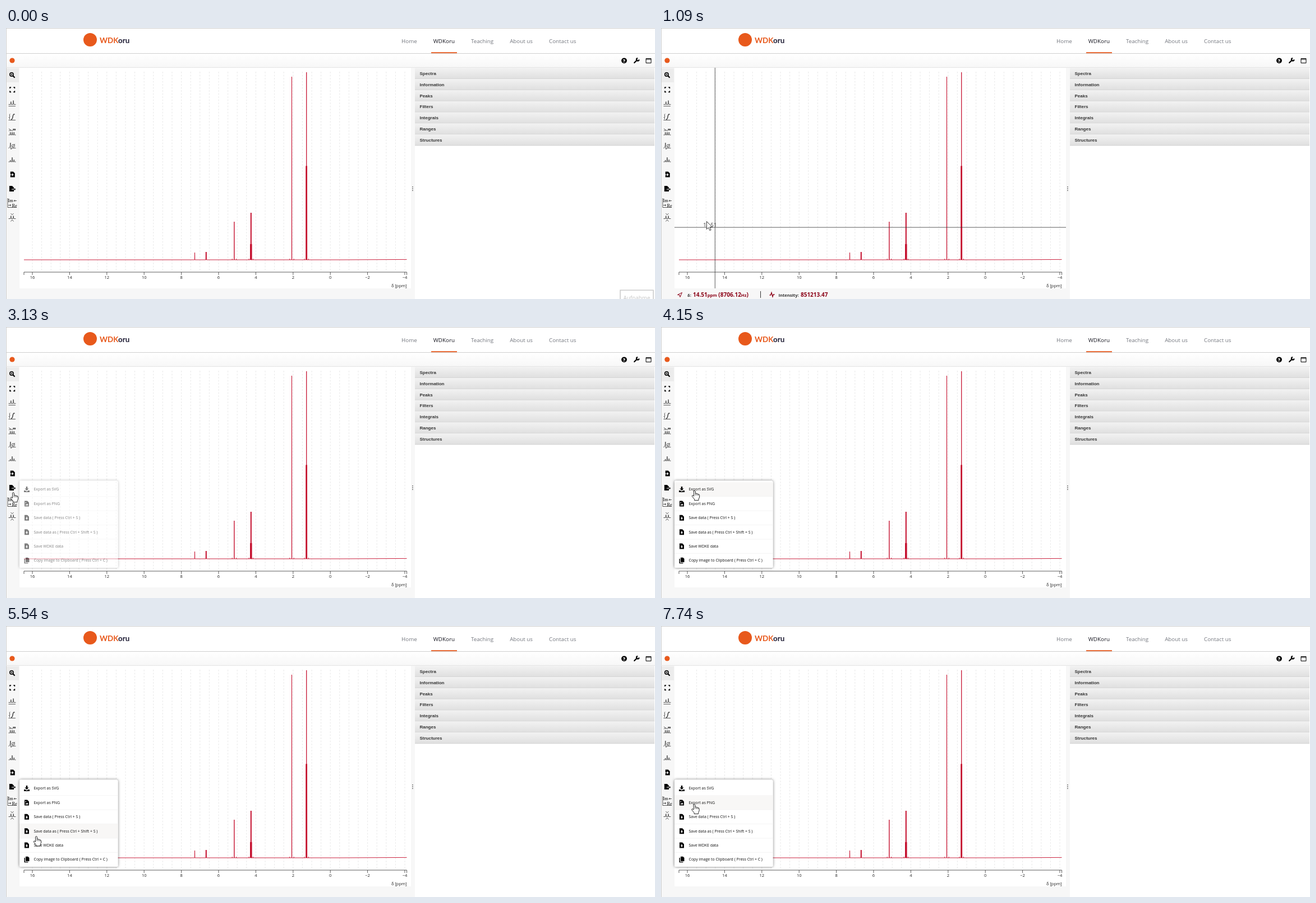
Recreate the animation shown at these times as an HTML page. Size 1157x484 px, loop 8000 ms.

```html
<!DOCTYPE html>
<html lang="en">
<head>
<meta charset="utf-8">
<title>Spectrum viewer</title>
<style>
html, body { margin: 0; width: 100%; height: 100%; overflow: hidden; background: #fff; }
svg { display: block; width: 100vw; height: 100vh; }
text { font-family: "Open Sans", "Noto Sans", sans-serif; white-space: pre; }
.nav { font-size: 9.8px; fill: #74777f; }
.nav .active { fill: #15151f; }
.axis { font-size: 7.5px; fill: #222; }
.head { font: bold 8px "Liberation Sans", Arial, sans-serif; fill: #333; }
.item { font-size: 6.95px; fill: #111; }
.foot { font-weight: 700; font-size: 7.6px; fill: #333; }
.foot .val { font-size: 10px; fill: #8b0016; }
.foot .unit { font-size: 7.6px; fill: #8b0016; }
.serif { font-family: "Liberation Serif", "Times New Roman", serif; }
.line { fill: none; stroke: #333; stroke-width: .8; }
</style>
</head>
<body>
<svg viewBox="0 0 1157 484" preserveAspectRatio="none">
  <defs>
    <linearGradient id="bar" x2="0" y2="1">
      <stop stop-color="#f2f2f2"/><stop offset="1" stop-color="#dfdfdf"/>
    </linearGradient>
    <linearGradient id="strip" x2="0" y2="1">
      <stop stop-color="#fff"/><stop offset="1" stop-color="#f7f7f7"/>
    </linearGradient>
    <filter id="shadow" x="-10%" y="-10%" width="120%" height="120%">
      <feDropShadow dx="0" dy="0" stdDeviation="2.6" flood-opacity=".55"/>
    </filter>
    <clipPath id="tools"><path d="M0 71H19.5V484H0Z"/></clipPath>
    <path id="file" d="M-4-5H1L4-2V5H-4Z"/>
  </defs>

  <path fill="#fff" d="M0 0H1157V484H0Z"/>
  <path fill="url(#strip)" d="M0 46H1157V71H0Z"/>
  <path fill="#f7f7f7" d="M0 71H24V484H0ZM24 465H729V484H24ZM722 71H729V484H722Z"/>
  <path fill="#ececec" d="M1 72H23V97H1Z"/>
  <path fill="none" stroke="#cfcfcf" d="M0 .5H1157M.5 0V484M0 45.5H1157"/>
  <path fill="none" stroke="#e4e4e4" d="M0 70.5H1157"/>

  <circle cx="150" cy="21" r="12" fill="#e8591c"/>
  <text x="167" y="27" font-size="13.4" font-weight="700" fill="#e8591c" style="font-family:Lato,sans-serif">WDK<tspan fill="#1d1b33">oru</tspan></text>
  <text class="nav" x="705" y="26.6">Home<tspan class="active" dx="29">WDKoru</tspan><tspan dx="29">Teaching</tspan><tspan dx="29">About us</tspan><tspan dx="29">Contact us</tspan></text>
  <path fill="#e8591c" d="M758 43.2H804V45H758Z"/>

  <circle cx="11" cy="58" r="4.6" fill="#e8591c"/>
  <circle cx="1102" cy="58.3" r="4.9"/>
  <text x="1102" y="61.5" text-anchor="middle" font-size="8.5" font-weight="800" fill="#fff">?</text>
  <path fill="none" stroke="#000" stroke-width="2.2" stroke-linecap="round" d="M1120.2 62L1125 57.2"/>
  <path fill="none" stroke="#000" stroke-width="2" d="M1126.2 53.9A2.4 2.4 0 1 0 1128.6 56.4"/>
  <path fill="none" stroke="#000" d="M1141 54.5H1150V62.5H1141ZM1141 56H1150"/>

  <g id="plot"></g>
  <g id="panel"></g>
  <path stroke="#444" stroke-width="1.4" stroke-dasharray="1.4 1.9" d="M724.9 283V291.5"/>

  <g clip-path="url(#tools)">
    <g fill="none" stroke="#000">
      <circle cx="10" cy="83" r="3.2" stroke-width="1.5"/>
      <path stroke-width="2" d="M12.5 85.5L15.6 88.7"/>
      <path stroke-width=".9" d="M8.3 83h3.4M10 81.3v3.4"/>
      <rect x="7" y="106" width="8.4" height="8.4" stroke-width="1.6" stroke-dasharray="4.2" stroke-dashoffset="2.1"/>
    </g>
    <g class="line">
      <path id="spikes"/>
      <path d="M4.5 139.5H17M4.5 164.5H17M7.5 153.5Q5.5 153.5 6.5 157T5 159.5Q7 160 6.5 163"/>
      <path stroke-width="1.4" d="M15.5 154.5Q13 152.5 12.2 158T9 163.5"/>
      <path d="M5 180L12 184M5 184Q7 181 9 184"/>
      <path d="M4.5 214.5Q7.5 215 8 205Q8.3 222 10 214.5H17.5M11 213L16 207"/>
      <circle cx="13" cy="210.5" r="2.6"/>
      <path d="M8.5 331L11 333.8 13.5 331M8.5 345.5L11 342.5 13.5 345.5"/>
      <path d="M3 304V320.5H19M19 308.5H14.5M16.2 307L14.2 308.5 16.2 310M4 316.5H8.5M7 315L9 316.5 7 318"/>
    </g>
    <text class="serif" x="12" y="183" font-size="7" font-style="italic" font-weight="700">m</text>
    <text class="serif" x="3.5" y="310.5" font-size="8.5">Im</text>
    <text class="serif" x="10.5" y="320" font-size="8.5">Re</text>
    <use href="#file" x="11.8" y="261.5"/>
    <path fill="none" stroke="#fff" stroke-width="1.2" d="M6.5 262H12.5M10.8 260L12.8 262 10.8 264"/>
    <use href="#file" x="10" y="287"/>
    <path fill="none" stroke="#fff" stroke-width="1.2" d="M10 288H14"/>
    <path d="M13.5 287.4H15V285.8L17.2 288 15 290.2V288.6H13.5Z"/>
  </g>

  <g id="record">
    <path fill="#fff" stroke="#cbcbcb" stroke-width="1.6" d="M1095 486V468.3H1154V486"/>
    <text x="1100.5" y="485.5" font-size="9.9" fill="#c6c6c6">Aufnahme</text>
  </g>

  <g id="cross">
    <path id="hair" class="line"/>
    <text id="mark" font-size="9.4" fill="#333"></text>
    <g fill="none" stroke="#8b0016">
      <path d="M29.5 476.5L37.5 472.5 34 480.5 33.2 477Z"/>
      <path stroke-width="1.3" d="M193.5 477H195.5L197 472.5 199 480 200.3 476H202.5"/>
    </g>
    <path stroke="#333" d="M177.5 470V482"/>
    <text class="foot" x="47" y="479.5">δ: <tspan class="val" id="ppm" x="57"></tspan><tspan class="unit">ppm</tspan><tspan class="val" id="hz"></tspan><tspan class="unit">Hz</tspan><tspan class="val">)</tspan></text>
    <text class="foot" x="209.5" y="479.5">Intensity: <tspan class="val" id="level" x="249"></tspan></text>
  </g>

  <g id="tip">
    <rect x="15.5" y="279" width="37" height="16" rx="2" fill="#7f7f7f"/>
    <text x="18" y="289.8" font-size="7.2" fill="#f4f4f4">Export As</text>
  </g>
  <circle id="press" cx="11" cy="294" r="11" fill="#808080" opacity=".3"/>

  <g id="menu">
    <rect x="24" y="274.5" width="175.5" height="155.5" rx="3" fill="#fff" filter="url(#shadow)"/>
    <g id="rows"></g>
  </g>

  <path id="arrow" fill="#fff" stroke="#222" stroke-width=".9" d="M0 0V14L3.2 11 5.6 16.2 7.8 15.2 5.5 10.2H10Z"/>
  <g id="hand">
    <path fill="#fff" stroke="#111" stroke-width=".9" stroke-linejoin="round"
      d="M-1.4 10.2V1.2Q0-.8 1.4 1.2V5.4Q3.2 4.4 4 6Q5.8 5.2 6.4 6.8Q8.4 6.2 8.6 8.5V12L7 15.5V17.6H-.4V15.6L-4.6 10.4Q-4.8 8.4-3 8.7Z"/>
    <path fill="none" stroke="#111" stroke-width=".7" d="M1.4 5.4V8.8M4 6V9M6.4 6.8V9.2"/>
  </g>
</svg>

<script>
const $ = id => document.getElementById(id);
const LOOP = 8000, STEP = 68, UNIT = 33.2, LEFT = 47, BASE = 414;
const ppmToX = p => LEFT + (16 - p) * UNIT;

// Small peaks in the toolbar icons: baseline, then peak heights
const spikes = (y, ...heights) => `M4.5 ${y}` + heights.map((h, i) => {
  const x = 4.5 + 13 * (i + 1) / (heights.length + 1);
  return `H${x - .8}L${x} ${y - h}L${x + .8} ${y}`;
}).join("") + "H17.5";
$("spikes").setAttribute("d", spikes(136.5, 5, 7) + spikes(191, 5, 5, 5) + spikes(239, 3, 8, 4) + spikes(340.5, 5, 5));

// Side panel
$("panel").innerHTML = ["Spectra", "Information", "Peaks", "Filters", "Integrals", "Ranges", "Structures"]
  .map((s, i) => `<g transform="translate(729 ${71.2 + i * 19.85})">
    <rect width="427" height="19.85" fill="url(#bar)"/>
    <path d="M0 19.5H427" stroke="#cdcdcd" stroke-width=".7"/>
    <text class="head" x="8.5" y="12.7">${s}</text></g>`).join("");

// A multiplet of n lines with binomial heights, and its two satellites
function multiplet(ppm, height, n) {
  const mid = ppmToX(ppm), peak = Math.floor((n - 1) / 2);
  const weights = [1];
  for (let i = 1; i < n; i++) weights.push(weights[i - 1] * (n - i) / i);
  const lines = weights.map((w, i) => {
    const x = mid + (i - (n - 1) / 2) * .75;
    return `L${x - .2} ${BASE}L${x} ${BASE - height * w / weights[peak]}L${x + .2} ${BASE}`;
  });
  const foot = height > 50 ? `M${mid - 3.7} ${BASE}v-2M${mid + 3.7} ${BASE}v-2M${mid} ${BASE}` : "";
  return lines.join("") + foot;
}

function drawPlot() {
  let grid = "", ticks = "M32 441V436H714.5V441", labels = "";
  for (let p = 16; p >= -4; p -= .5) {
    const x = ppmToX(p);
    grid += `M${x} 78V433`;
    if (p % 2 === 0) {
      ticks += `M${x} 436V441`;
      labels += `<text class="axis" x="${x}" y="448" text-anchor="middle">${String(p).replace("-", "−")}</text>`;
    }
  }
  const signal = `M32 ${BASE}` + multiplet(7.28, 13, 1) + multiplet(6.67, 14, 2) + multiplet(5.16, 68, 1) +
    multiplet(4.26, 84, 4) + multiplet(2.07, 327, 1) + multiplet(1.28, 335, 3) + "H600L714.5 413.4";
  $("plot").innerHTML = `<path d="${grid}" fill="none" stroke="#e6e6e6" stroke-width=".9" stroke-dasharray="3 2.5"/>
    <path d="${signal}" fill="none" stroke="#c50d2c" stroke-width=".9"/>
    <path d="${ticks}" class="line"/>${labels}
    <text class="axis" x="714.5" y="462.5" text-anchor="end">δ [ppm]</text>`;
}
drawPlot();

// Export menu
const ROW = 25.4, TOP = 277.3;
const glyphs = {
  load: `<path d="M-1.3-5H1.3V-1.5H3.5L0 2.2-3.5-1.5H-1.3ZM-5 2H-2.5L0 4 2.5 2H5V5H-5Z"/>`,
  image: `<use href="#file"/><path fill="#fff" d="M-2.8 3.2L-1 .8 0 1.8 1.3 0 2.8 3.2ZM-2.5-2.5h1.5v1.5h-1.5z"/>`,
  save: `<use href="#file"/><path fill="#fff" d="M-.7-1.8H.7V.6H2.3L0 3.2-2.3.6H-.7Z"/>`,
  copy: `<path d="M-2-5.2H2.2L4.5-3V3H-2ZM-4.5-3H-3V4H2.5V5.3H-4.5Z"/>`
};
$("rows").innerHTML = [["load", "Export as SVG"], ["image", "Export as PNG"], ["save", "Save data ( Press Ctrl + S )"],
  ["save", "Save data as ( Press Ctrl + Shift + S )"], ["save", "Save WDKE data"],
  ["copy", "Copy image to Clipboard ( Press Ctrl + C )"]]
  .map(([glyph, label], i) => `<g transform="translate(24 ${TOP + i * ROW})">
    <rect width="175.5" height="${ROW}" fill="#f8f7f6"/>
    ${i < 5 ? `<path d="M0 ${ROW}H175.5" stroke="#f1f1f1" stroke-width=".8"/>` : ""}
    <g transform="translate(13 ${ROW / 2})">${glyphs[glyph]}</g>
    <text class="item" x="25.5" y="15.1">${label}</text></g>`).join("");
const hovers = [...$("rows").querySelectorAll("rect")];

// Pointer legs: when they start, how many steps, where to, easing power
const OPEN = 3130, PRESS = 2580;
const legs = [
  { t: 70, n: 10, to: [210.3, 424.4], ease: 1.5 },
  { t: 750, n: 1, to: [170.5, 409] },
  { t: 818, n: 15, to: [10, 294.5], ease: 2 },
  { t: OPEN, n: 2, to: [16, 296] },
  { t: 3730, n: 7, to: [60, 292] },
  { t: 4490, n: 16, to: [54, 375.3] },
  { t: 5580, n: 11, to: [51.5, 419.5] },
  { t: 6640, n: 2, to: [56.7, 398.5] },
  { t: 6776, n: 10, to: [57.5, 323.5] },
  { t: 7600, n: 3, to: [59.5, 318] }
];

// Pointer position; it moves in whole steps
function pointer(time) {
  let pos = [1010, 490];
  for (const { t, n, to, ease = 1 } of legs) {
    if (time < t) break;
    const k = Math.min(n, Math.floor((time - t + 2) / STEP) + 1);
    const f = 1 - (1 - k / n) ** ease;
    pos = pos.map((v, i) => v + (to[i] - v) * f);
  }
  return pos;
}

const show = (id, on) => $(id).style.display = on ? "" : "none";

function drawCross([x, y]) {
  const ppm = (16 - (x - LEFT) / UNIT).toFixed(2);
  $("hair").setAttribute("d", `M${x} 71V465M24 ${y}H722`);
  $("mark").setAttribute("x", x - 21);
  $("mark").setAttribute("y", y - .8);
  $("mark").textContent = $("ppm").textContent = ppm;
  $("hz").textContent = ` (${(ppm * 600.008).toFixed(2)}`;
  $("level").textContent = (774570.3 + 91000 * Math.sin((x - 210.3) * 1.7)).toFixed(2);
}

function render(t) {
  const [x, y] = pointer(t), trail = pointer(t - STEP);
  const moving = t >= 70, menu = t >= OPEN, hand = menu || x < 24;
  const inPlot = moving && !hand && trail[0] < 722 && trail[1] < 465;
  show("record", !moving);
  show("cross", inPlot);
  if (inPlot) drawCross(trail);
  show("tip", t >= 1560 && !menu);
  show("press", t >= PRESS && !menu);
  show("menu", menu);
  $("menu").style.opacity = t < OPEN + STEP ? .5 : 1;
  const row = menu && x > 24 ? Math.floor((y - TOP) / ROW) : -1;
  hovers.forEach((r, i) => r.style.display = i === row ? "" : "none");
  show("arrow", moving && !hand);
  show("hand", hand);
  $(hand ? "hand" : "arrow").setAttribute("transform", `translate(${x} ${y})`);
}

const start = performance.now();
function tick() {
  render((performance.now() - start) % LOOP);
  requestAnimationFrame(tick);
}
render(0);
requestAnimationFrame(tick);
</script>
</body>
</html>
```
